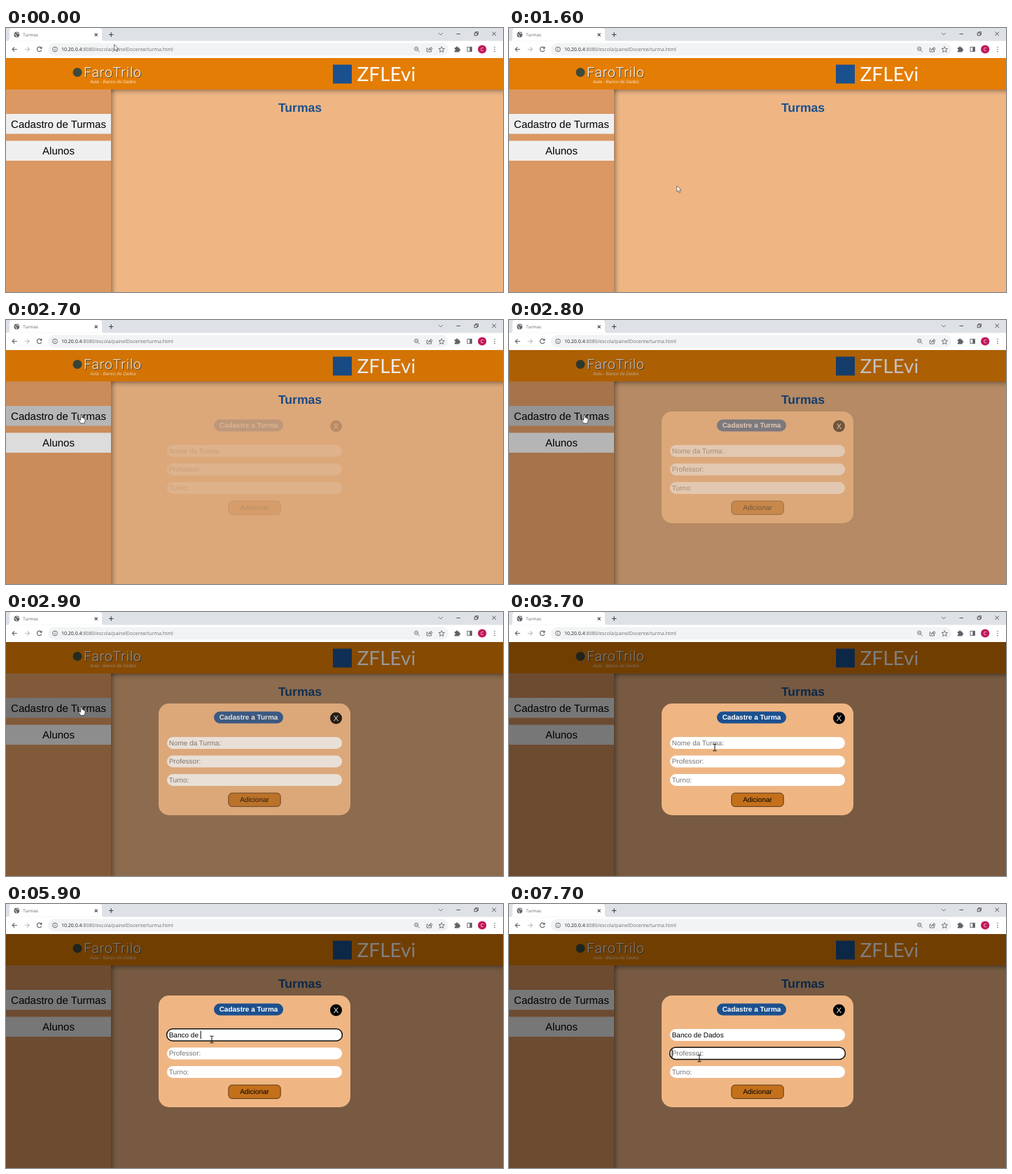
Recreate the animation shown at these times as an HTML page. Size 710 by 378 pixels, loop 8000 ms.

```html
<!DOCTYPE html>
<html lang="pt">
<head>
<meta charset="utf-8">
<title>Turmas</title>
<style>
html, body { margin: 0; width: 100%; height: 100%; overflow: hidden; background: #fff; }
svg { display: block; width: 100vw; height: 100vh; }
text { font-family: "Liberation Sans", Arial, sans-serif; text-rendering: geometricPrecision; white-space: pre; }
.ui { font-family: "Open Sans", "Noto Sans", sans-serif; }
.team { font: 300 19.5px Roboto, sans-serif; letter-spacing: .8px; }
.brand { font: 400 28px Lato, sans-serif; }
.mid { text-anchor: middle; }
.big { font-size: 15px; }
.form text { font-size: 10px; }
.form .close { font-size: 11px; }
.icon { fill: none; stroke: #5f6368; stroke-width: 1.1; }
.hint { fill: #757575; }
.ring { fill: none; stroke: #101010; stroke-width: 1.5; }
</style>
</head>
<body>
<svg viewBox="0 0 710 378" preserveAspectRatio="none">
  <defs>
    <linearGradient id="right">
      <stop offset="0" stop-opacity=".3"/><stop offset=".3" stop-opacity=".17"/>
      <stop offset=".6" stop-opacity=".06"/><stop offset="1" stop-opacity="0"/>
    </linearGradient>
    <linearGradient id="down" href="#right" x2="0" y2="1"/>
  </defs>

  <!-- browser window -->
  <rect width="710" height="43" fill="#fff"/>
  <rect width="710" height="18.5" fill="#dee1e6"/>
  <path d="M2 18.5Q5 18.5 5 15V4Q5 0 9 0H133Q137 0 137 4V15Q137 18.5 140 18.5Z" fill="#fff"/>
  <circle cx="15.3" cy="9.5" r="3.9" fill="#5f6368"/>
  <path d="M12.4 8.6q2 .4 2.2 2.2t1 2.2M15 6.2q.2 1.9 3.4 2" fill="none" stroke="#fff" stroke-width="1"/>
  <text class="ui" x="24.3" y="11.8" font-size="6.2" fill="#5f6368">Turmas</text>
  <g class="icon">
    <path d="M126.7 7.7l4 4m0-4l-4 4M147 9.5h6.4m-3.2-3.2v6.4" stroke="#3c4043"/>
    <path d="M618 7l3 3 3-3" stroke-width=".8"/>
    <path d="M643.5 8.5h5.5M669.2 7h3.8v3.8h-3.8zM670.7 7V5.6h3.8v3.8H673M694.5 5.5l5.5 5.5m0-5.5l-5.5 5.5" stroke="#333" stroke-width=".8"/>
    <path d="M15.8 30.5H9m3.2-3.2L9 30.5l3.2 3.2"/>
    <path d="M26.6 30.5h6.8m-3.2-3.2l3.2 3.2-3.2 3.2" stroke="#bcbfc3"/>
    <path d="M50.3 28.4A3.3 3.3 0 1 0 50.8 31.5M50.9 26.7v2.4h-2.4"/>
  </g>
  <rect x="60" y="21.5" width="572" height="18" rx="9" fill="#f1f3f4"/>
  <g class="icon" style="stroke-width:.9">
    <circle cx="70" cy="30.5" r="3.4"/><path d="M70 30v2.2M70 28.3v.9"/>
    <circle cx="586.2" cy="29.8" r="2.6"/><path d="M588.2 31.8l2.6 2.6M585 29.8h2.4"/>
    <path d="M603 29h-1.8v5h6.4v-1.6M603.3 32q.4-3 3.6-3v-1.6l2 2.4-2 2.3v-1.6q-2.3-.1-3.6 1.5"/>
    <path d="M622.3 26.7l1.2 2.7 2.9.3-2.2 1.9.7 2.9-2.6-1.5-2.6 1.5.7-2.9-2.2-1.9 2.9-.3z"/>
    <rect x="659" y="27.3" width="6.4" height="6.4"/>
  </g>
  <path d="M662.3 27.3h3.1v6.4h-3.1zM640.8 28h2.1q0-1.7 1.3-1.7t1.3 1.7h2.1v2.1q1.6 0 1.6 1.3t-1.6 1.3v1.8h-6.8v-2q1.4-.2 1.4-1.2t-1.4-1.2z" fill="#5f6368"/>
  <circle cx="680.2" cy="30.5" r="6.1" fill="#c2185b"/>
  <text class="ui mid" x="680.2" y="33" font-size="7" fill="#fff">C</text>
  <path d="M698 27.4v.1m0 3v.1m0 3v.1" stroke="#5f6368" stroke-width="1.5" stroke-linecap="round"/>
  <text class="ui" x="79" y="33.1" font-size="7" fill="#6a6e73"><tspan fill="#202124">10.20.0.4</tspan>:8080/escola/painelDocente/turma.html</text>

  <!-- page -->
  <rect y="43" width="710" height="335" fill="#efb684"/>
  <rect x="150" y="88" width="560" height="9" fill="url(#down)"/>
  <rect x="150" y="88" width="9" height="290" fill="url(#right)"/>
  <rect y="88" width="150" height="290" fill="#db9862"/>
  <rect y="43" width="710" height="45" fill="#e47d04"/>
  <circle cx="102" cy="63.5" r="6.5" fill="#3d4a3c"/>
  <text class="team" x="112" y="71" fill="#4b4a38">FaroTrilo</text>
  <text class="team" x="111" y="70" fill="#fff">FaroTrilo</text>
  <text x="120" y="78.5" font-size="6.4" font-style="italic" fill="#f6e3cb">Aula - Banco de Dados</text>
  <rect x="467" y="52.5" width="27" height="27" fill="#1b508f"/>
  <text class="brand" x="501.5" y="76" fill="#fff">ZFLEvi</text>
  <text class="mid" x="420" y="120" font-size="17.6" font-weight="bold" fill="#1b508f">Turmas</text>
  <rect id="menu" y="123" width="150" height="28.5"/>
  <rect y="161.5" width="150" height="28.5" fill="#efefef"/>
  <text class="mid big" x="75" y="142.5">Cadastro de Turmas</text>
  <text class="mid big" x="75" y="181">Alunos</text>

  <!-- dialog -->
  <rect id="shade" y="43" width="710" height="335"/>
  <rect id="panel" x="218" y="131" width="274" height="160" rx="15" fill="#efb684"/>
  <g id="form" class="form">
    <rect x="297" y="142.5" width="99" height="17" rx="8.5" fill="#1b508f"/>
    <text class="mid" x="346.5" y="154.4" font-weight="bold" fill="#fff">Cadastre a Turma</text>
    <circle cx="471.5" cy="152" r="8.5"/>
    <text class="mid close" x="471.5" y="155.9" fill="#fff">X</text>
    <g id="fields"></g>
    <rect x="317.9" y="259.2" width="74.3" height="19.4" rx="5" fill="#c4701b" stroke="#4a2c10" stroke-width=".9"/>
    <text class="mid" x="355" y="271.9">Adicionar</text>
  </g>
  <rect id="veil" x="218" y="131" width="274" height="160" rx="15" opacity=".078"/>
  <rect id="caret" width="1" height="11.5"/>

  <!-- pointers, each with its hot spot at 0,0 -->
  <path id="arrow" d="M0 0V8.8L2 7 3.4 10.200 4.900 9.500 3.500 6.400H6.200Z" fill="#fff" stroke="#444" stroke-width=".7"/>
  <path id="hand" d="M-1 .6Q0-.6 1 .6V4.300Q2 0 3 4.600Q4 4 4.400 5.100Q5.500 4.700 5.500 6V8.500L4.300 12H-.9L-3.600 7.600Q-3.600 6-2.200 6.600L-1 7.700Z" fill="#fff" stroke="#222" stroke-width=".7"/>
  <path id="beam" d="M-2.600-4.800H-.8Q0-4.800 0-4Q0-4.800.8-4.800H2.600M0-4V4M-2.600 4.800H-.8Q0 4.800 0 4Q0 4.800.8 4.800H2.600" fill="none" stroke="#111" stroke-width="1"/>
</svg>
<script>
const LOOP = 8000, STEP = 100;
const $ = id => document.getElementById(id);
const show = (node, on) => node.setAttribute('visibility', on ? 'visible' : 'hidden');
const place = (node, x, y) => node.setAttribute('transform', `translate(${x} ${y})`);
const clamp = v => Math.max(0, Math.min(1, v));

const hints = ['Nome da Turma:', 'Professor:', 'Turno:'];
const fieldY = i => 179 + i * 26.5;
$('fields').innerHTML = hints.map((hint, i) => `
  <rect x="230" y="${fieldY(i)}" width="250" height="17" rx="8.5" fill="#fff"/>
  <rect class="ring" x="229.6" y="${fieldY(i) - .2}" width="250.8" height="17.2" rx="8.6"/>
  <text x="232.7" y="${fieldY(i) + 11.6}" class="hint">${hint}</text>`).join('');
const rings = [...document.querySelectorAll('.ring')];
const labels = [...document.querySelectorAll('#fields text')];

// time, x, y
const path = [
  [0, 154.6, 23.5], [800, 273, 164], [1500, 273, 164], [1600, 239.8, 225.8], [1700, 239.8, 225.8],
  [2500, 107.5, 136], [2900, 107.5, 136], [3600, 294, 194], [7000, 294, 194], [7500, 272, 221]
];
const typed = 'Banco de Dados';
const keyTimes = [4900, 5000, 5100, 5300, 5400, 5500, 5600, 5700, 5800, 6200, 6300, 6400, 6500, 6600];
const focusTimes = [3800, 7500];
const openAt = 2653, fade = 300, blink = 500;

function pointerAt(t) {
  const next = path.findIndex(p => p[0] > t);
  if (next < 0) return path[path.length - 1].slice(1);
  const [t0, x0, y0] = path[next - 1], [t1, x1, y1] = path[next];
  const u = (t - t0) / (t1 - t0), e = u * u * (3 - 2 * u);
  return [x0 + (x1 - x0) * e, y0 + (y1 - y0) * e];
}

function drawPointer(t, open) {
  const [x, y] = pointerAt(t);
  const hover = open < 1 && x < 150 && y > 123 && y < 151.5;
  const inField = open === 1 && x > 230 && x < 480 &&
    hints.some((_, i) => y > fieldY(i) && y < fieldY(i) + 17);
  const kind = hover ? 'hand' : inField ? 'beam' : 'arrow';
  for (const id of ['arrow', 'hand', 'beam']) {
    show($(id), id === kind);
    place($(id), x, y);
  }
  $('menu').setAttribute('fill', hover ? '#c5c5c5' : '#efefef');
}

function drawForm(t, open) {
  $('shade').setAttribute('opacity', open / 2);
  $('form').setAttribute('opacity', open);
  show($('panel'), open > 0);
  show($('veil'), open > 0 && open < 1);

  const count = keyTimes.filter(k => k <= t).length;
  labels[0].textContent = count ? typed.slice(0, count) : hints[0];
  labels[0].setAttribute('class', count ? '' : 'hint');

  const focus = focusTimes.filter(f => f <= t).length - 1;
  rings.forEach((ring, i) => show(ring, i === focus));
  const lastInput = Math.max(0, ...[...keyTimes, ...focusTimes].filter(k => k <= t));
  show($('caret'), focus >= 0 && t - lastInput < blink);
  const shift = focus === 0 && count ? labels[0].getComputedTextLength() : 0;
  place($('caret'), 232.6 + shift, fieldY(Math.max(0, focus)) + 2.6);
}

function draw(now) {
  const t = Math.floor((now % LOOP) / STEP) * STEP;
  const open = clamp((t - openAt) / fade);
  drawForm(t, open);
  drawPointer(t, open);
}

const start = performance.now();
function tick() {
  draw(performance.now() - start);
  requestAnimationFrame(tick);
}
tick();
</script>
</body>
</html>
```
